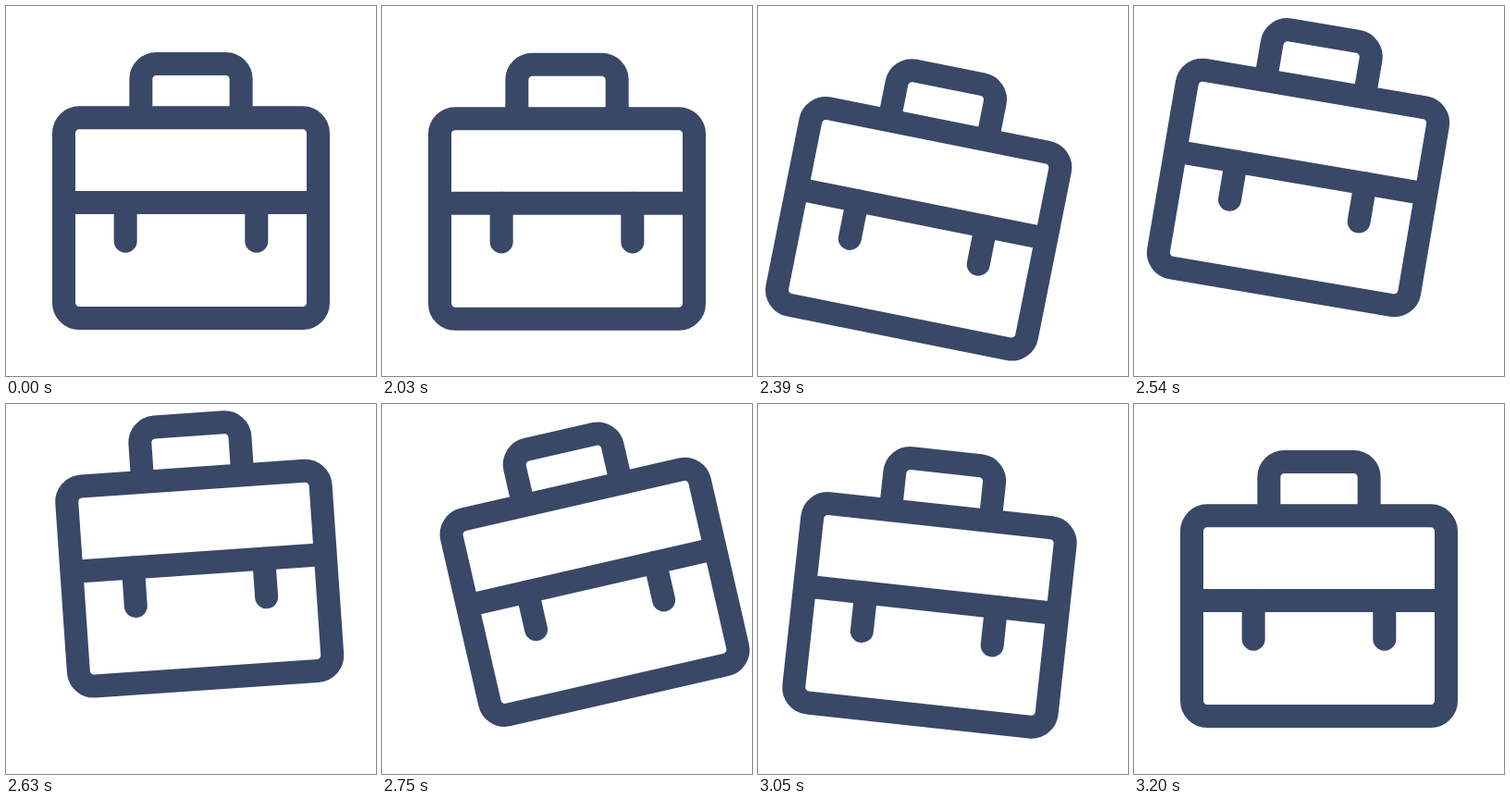
Write an HTML page that moves like this. It is 400x400 px and loops after 3.23 s.

```html
<!DOCTYPE html>
<html lang="en">
<head>
<meta charset="utf-8">
<title>Briefcase</title>
<style>
  html, body { margin: 0; width: 100%; height: 100%; overflow: hidden; background: #fff; }
  svg { display: block; width: 100vw; height: 100vh; }
  g { fill: none; stroke: #394867; stroke-width: 3; }
</style>
</head>
<body>
<svg viewBox="0 0 48 48">
  <g id="case">
    <rect x="7.5" y="14.5" width="33" height="26" rx="2"/>
    <path d="M17.5 14.5v-5a2 2 0 0 1 2-2h9a2 2 0 0 1 2 2v5M7.5 25.5h33"/>
    <path d="M15.5 25.5v5M32.5 25.5v5" stroke-linecap="round"/>
  </g>
</svg>
<script>
  const LOOP = 3230, START = 2000, STEP = 30, UNIT = 48 / 400;
  const PIVOT = '24 11.4';

  // Keys are [step, value], joined by an ease in and out.
  const tilt = [[2, 0], [16.2, 13], [24.3, -13.6], [31.2, 10], [40.3, 0]];
  const lift = [[0, 0], [9.9, 28.5], [20.5, -40.5], [30.2, 0]];

  function valueAt(keys, k) {
    const i = keys.findIndex(key => key[0] > k);
    if (i === 0) return keys[0][1];
    if (i < 0) return keys[keys.length - 1][1];
    const [k0, v0] = keys[i - 1], [k1, v1] = keys[i];
    const u = (k - k0) / (k1 - k0);
    return v0 + (v1 - v0) * u * u * (3 - 2 * u);
  }

  const bag = document.getElementById('case');
  const origin = performance.now();

  function draw(now) {
    const t = Math.max(0, now - origin) % LOOP;
    const k = Math.max(0, Math.floor((t - START) / STEP));
    const y = valueAt(lift, k) * UNIT;
    const angle = k < 40 ? valueAt(tilt, k) : 0;
    bag.setAttribute('transform', `translate(0 ${y}) rotate(${angle} ${PIVOT})`);
    requestAnimationFrame(draw);
  }
  draw(origin);
</script>
</body>
</html>
```
